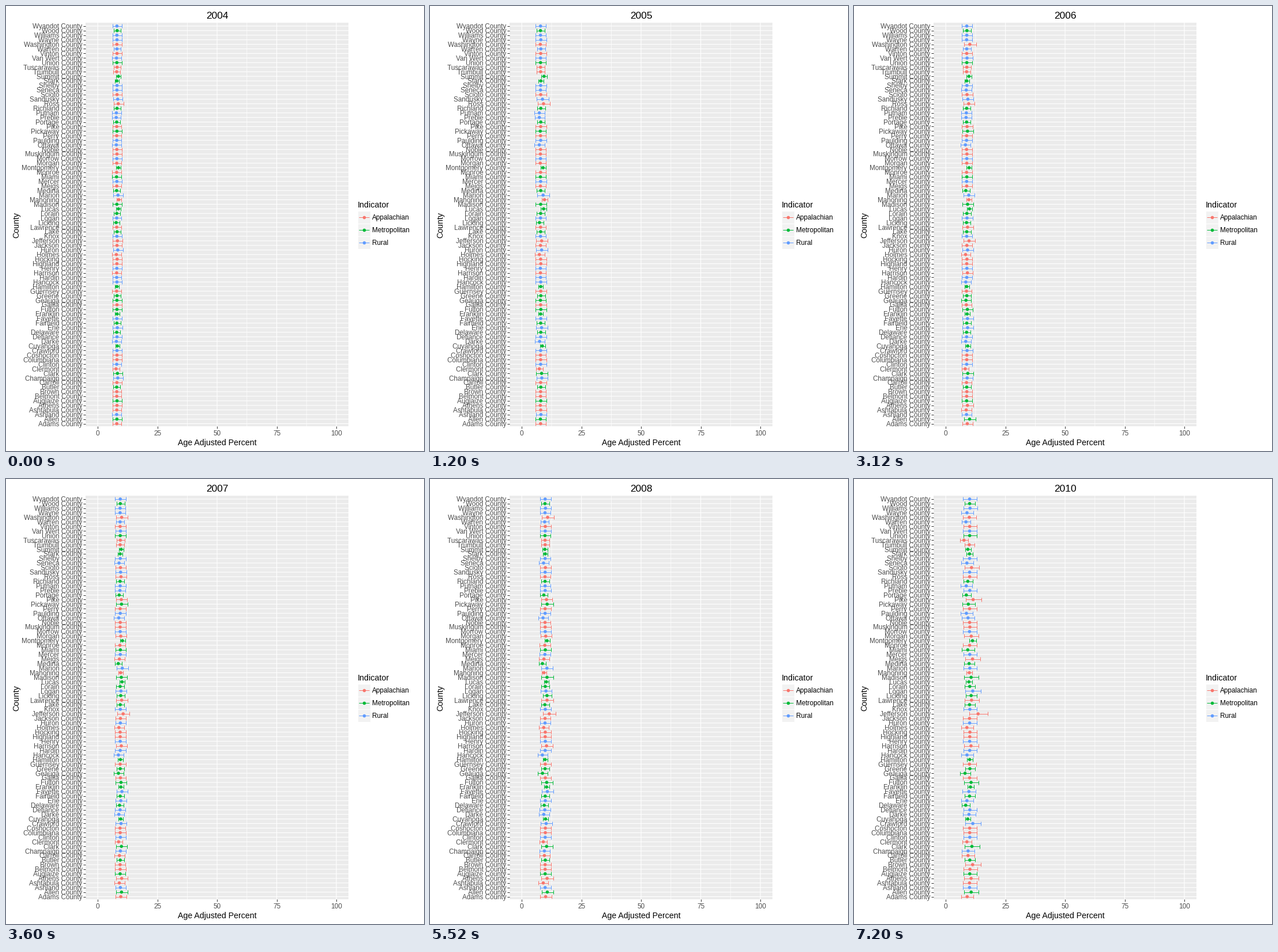
Animation, 725 px wide and 773 px high, one loop 8 s. Source, as a matplotlib script:

```python
import numpy as np
import matplotlib.pyplot as plt
from matplotlib.animation import FuncAnimation
from matplotlib.collections import LineCollection
from matplotlib.patches import Rectangle

W, H, DPI = 725, 773, 64
PT = 72 / DPI  # points per pixel
X0, UNIT = 159.2, 4.138  # pixel of 0 %, pixels per 1 %
TOP, BOTTOM = 34.8, 725.5  # pixel rows of the last and first county
LEFT, RIGHT, PANEL_TOP, PANEL_BOTTOM = 138, 594, 29, 730
DOT, CAP = 5.6, 3.5  # point diameter, half height of an error bar's end

COLORS = {"A": "#F8766D", "M": "#00BA38", "R": "#619CFF"}
LABELS = {"A": "Appalachian", "M": "Metropolitan", "R": "Rural"}

GROUPS = {
    "A": """Adams Ashtabula Athens Belmont Brown Carroll Clermont Columbiana
        Coshocton Gallia Guernsey Harrison Highland Hocking Holmes Jackson
        Jefferson Lawrence Mahoning Meigs Monroe Morgan Muskingum Noble Perry
        Pike Ross Scioto Trumbull Tuscarawas Vinton Washington""",
    "M": """Allen Auglaize Butler Clark Cuyahoga Delaware Fairfield Franklin
        Fulton Geauga Greene Hamilton Lake Licking Lorain Lucas Madison Medina
        Miami Montgomery Pickaway Portage Richland Stark Summit Union Wood""",
    "R": """Ashland Champaign Clinton Crawford Darke Defiance Erie Fayette
        Hancock Hardin Henry Huron Knox Logan Marion Mercer Morrow Ottawa
        Paulding Preble Putnam Sandusky Seneca Shelby Van_Wert Warren Wayne
        Williams Wyandot""",
}
KIND = {name.replace("_", " "): kind
        for kind, names in GROUPS.items() for name in names.split()}
COUNTIES = sorted(KIND)
ROWS = np.linspace(BOTTOM, TOP, len(COUNTIES))
YEARS = np.arange(2004, 2011)

# State-wide level and half interval for each year
LEVEL = [8.0, 7.9, 8.8, 9.4, 9.8, 9.9, 10.0]
SPREAD = [1.9, 2.2, 2.15, 2.2, 2.25, 2.75, 2.8]

LARGE = "Cuyahoga Franklin Hamilton Lucas Mahoning Montgomery Stark Summit"
MEDIUM = """Butler Clermont Delaware Fairfield Greene Lake Licking Lorain
    Medina Portage Richland Trumbull Tuscarawas Warren Wood"""

# Distance from the state level in 2005, then in 2008 and 2010
EARLY = dict(Champaign=.5, Clark=.5, Clermont=-.6, Cuyahoga=.6, Darke=-.5,
             Erie=.4, Holmes=-.5, Huron=.4, Jefferson=.4, Licking=-.5,
             Lucas=1.3, Mahoning=1.5, Marion=1, Montgomery=1.1, Ottawa=-.5,
             Preble=-.5, Putnam=-.5, Ross=1.2, Sandusky=.7, Summit=1.4)
LATE = dict(
    Adams=(.3, -1), Allen=(.8, .6), Ashtabula=(-.7, 0), Athens=(.9, .6),
    Brown=(0, 1.2), Carroll=(-.4, -.6), Champaign=(-.3, -.6), Clark=(.6, .8),
    Clermont=(-.7, -1.1), Crawford=(.4, 1.3), Cuyahoga=(0, -.8),
    Darke=(-.6, -.3), Delaware=(-.4, -1.6), Erie=(.1, -1.1),
    Fayette=(.9, -.3), Franklin=(.5, .3), Fulton=(.6, .6),
    Geauga=(-1.1, -1.9), Hancock=(-1.3, -1.1), Harrison=(.6, .6),
    Holmes=(-.6, -1.1), Jefferson=(1.7, 3.6), Lawrence=(.8, .8),
    Licking=(.7, .6), Logan=(.4, 1.2), Lucas=(.5, -.3), Madison=(.8, .6),
    Mahoning=(-.5, -.2), Marion=(.7, .1), Medina=(-1.2, -.2),
    Meigs=(-.5, 1.4), Miami=(.1, -.8), Montgomery=(.8, 1.2),
    Morgan=(.2, .7), Ottawa=(-.8, -.8), Paulding=(0, -1.3),
    Pickaway=(.9, -.5), Pike=(.6, 1.4), Portage=(-.6, -1.4),
    Putnam=(.1, -1.4), Richland=(-.1, -.8), Scioto=(.1, .8),
    Seneca=(-.7, -1.3), Summit=(-.1, -.8), Tuscarawas=(0, -2.4),
    Warren=(-.1, -1.6), Washington=(.9, -.2), Wayne=(0, -1.1))
BUMPS = {("Washington", 2006): 1, ("Allen", 2006): .9, ("Wyandot", 2009): .8,
         ("Harrison", 2009): 1, ("Columbiana", 2009): 1.2,
         ("Muskingum", 2009): 1, ("Pickaway", 2009): .6, ("Fulton", 2009): .6}


def estimates():
    """Centre, low and high percent as arrays of county by year."""
    rng = np.random.default_rng(4)
    mid = np.empty((len(COUNTIES), len(YEARS)))
    half = np.empty_like(mid)
    for i, name in enumerate(COUNTIES):
        first, (then, last) = EARLY.get(name, 0), LATE.get(name, (0, 0))
        bend = then + .3 * (last - then)
        shift = np.interp(YEARS, (2003, 2005, 2008, 2009, 2010),
                          (0, first, then, bend, last))
        shift += [BUMPS.get((name, year), 0) for year in YEARS]
        mid[i] = LEVEL + shift + rng.normal(0, .06, len(YEARS))
        size = .45 if name in LARGE else .75 if name in MEDIUM else 1
        half[i] = np.array(SPREAD) * size * mid[i] / LEVEL
    return mid, mid - .96 * half, mid + 1.06 * half


def to_x(percent):
    return X0 + UNIT * percent


def write(x, y, text, size, color="black", **kw):
    return ax.text(x, y, text, fontsize=size * PT, color=color,
                   family="Liberation Sans", **kw)


def line(xs, ys, width, color, **kw):
    ax.plot(xs, ys, color=color, lw=width * PT, solid_capstyle="butt", **kw)


def grid(xs, ys, width=1.1):
    line(xs, ys, width, "white", snap=False)


def box(x, y, w, h, color, edge="none"):
    ax.add_patch(Rectangle((x, y), w, h, fc=color, ec=edge, lw=PT))


def draw_panel():
    box(LEFT, PANEL_TOP, RIGHT - LEFT, PANEL_BOTTOM - PANEL_TOP, "#EBEBEB")
    for v in np.arange(12.5, 100, 25):
        grid([to_x(v)] * 2, [PANEL_TOP, PANEL_BOTTOM], .7)
    for y, name in zip(ROWS, COUNTIES):
        grid([LEFT, RIGHT], [y, y])
        line([LEFT - 4, LEFT], [y, y], 1, "#333333")
        write(132.6, y + 4.4, name + " County", 11.65, "#4D4D4D", ha="right")
    for v in range(0, 101, 25):
        x = to_x(v)
        grid([x, x], [PANEL_TOP, PANEL_BOTTOM])
        line([x, x], [PANEL_BOTTOM, PANEL_BOTTOM + 4], 1, "#333333")
        write(x, 746.4, str(v), 11.7, "#4D4D4D", ha="center")
    write(366, 763, "Age Adjusted Percent", 14.1, ha="center")
    write(22.5, 380.5, "County", 14.1, ha="center", va="baseline",
          rotation=90, rotation_mode="anchor")


def draw_legend():
    write(609.5, 350, "Indicator", 14.2)
    for i, (kind, color) in enumerate(COLORS.items()):
        y = 367 + 22 * i
        box(610, y - 11, 22, 22, "#F2F2F2", "white")
        line([612.5, 630], [y, y], 1, color)
        ax.scatter([621.5], [y], s=(DOT * PT) ** 2, c=color, lw=0, zorder=4)
        write(635, y + 4.3, LABELS[kind], 11.8)


MID, LOW, HIGH = (to_x(a) for a in estimates())

fig = plt.figure(figsize=(W / DPI, H / DPI), dpi=DPI, facecolor="white")
ax = fig.add_axes([0, 0, 1, 1])
ax.set(xlim=(0, W), ylim=(H, 0))
ax.axis("off")
draw_panel()
draw_legend()

tints = [COLORS[KIND[name]] for name in COUNTIES]
bars = LineCollection([], colors=np.repeat(tints, 3), linewidths=PT, zorder=3)
ax.add_collection(bars, autolim=False)
dots = ax.scatter(MID[:, 0], ROWS, s=(DOT * PT) ** 2, c=tints, lw=0, zorder=4)
title = write(366.3, 22, "", 17.4, ha="center")


def update(frame):
    k = frame // 3
    segments = []
    for a, b, y in zip(LOW[:, k], HIGH[:, k], ROWS):
        segments += [[(a, y), (b, y)],
                     [(a, y - CAP), (a, y + CAP)],
                     [(b, y - CAP), (b, y + CAP)]]
    bars.set_segments(segments)
    dots.set_offsets(np.column_stack([MID[:, k], ROWS]))
    title.set_text(str(YEARS[k]))
    return bars, dots, title


anim = FuncAnimation(fig, update, frames=20, interval=400, repeat=True,
                     repeat_delay=0, init_func=lambda: update(0))
plt.show()
```
